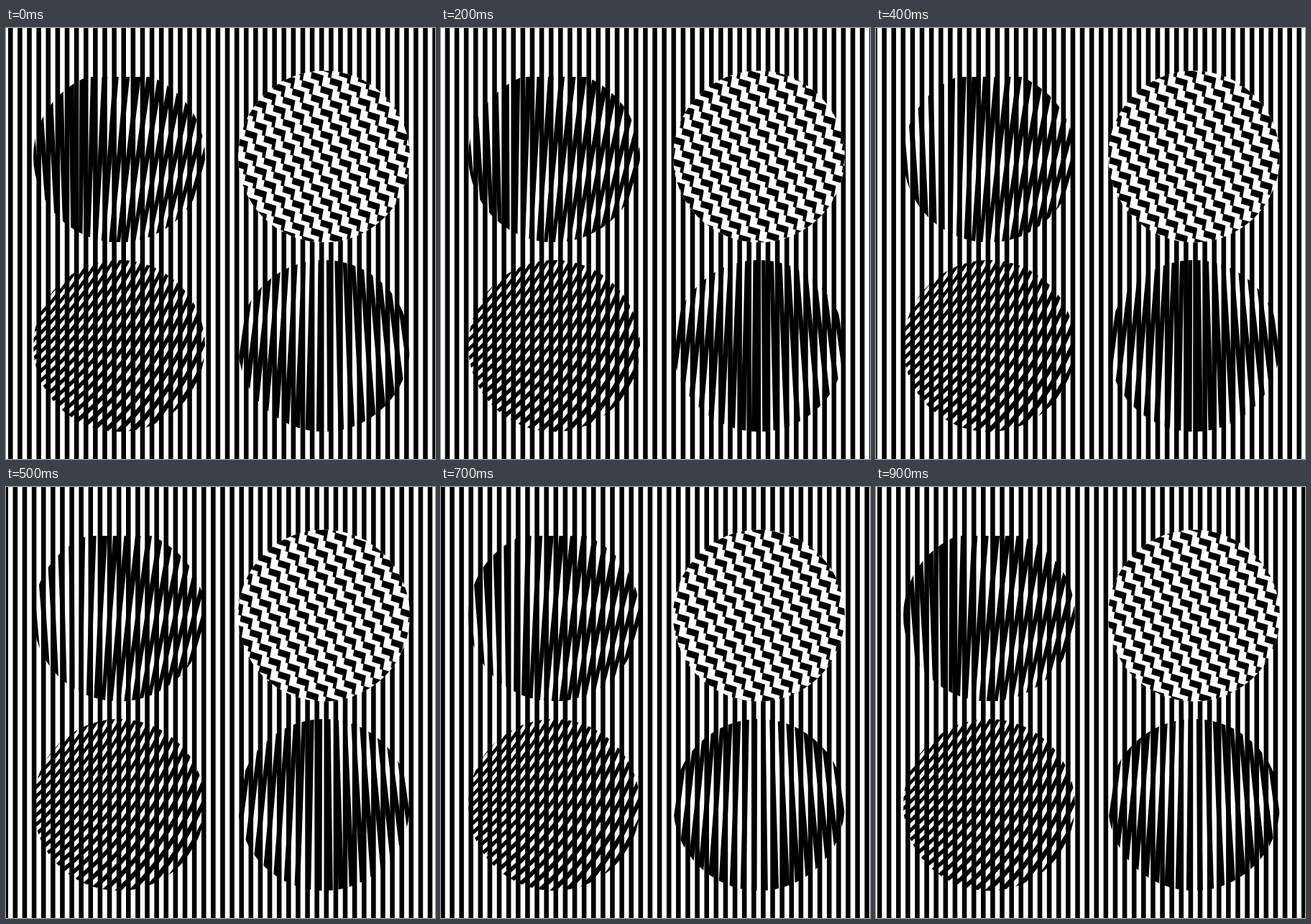
Recreate the animation shown at these times as an HTML page. Size 597 px wide and 600 px high, loop 1000 ms.

```html
<!DOCTYPE html>
<html lang="en">
<head>
<meta charset="utf-8">
<title>Moving stripes</title>
<style>
  html, body { margin: 0; width: 100%; height: 100%; overflow: hidden; background: #fff; }
  svg { display: block; width: 100%; height: 100%; }
</style>
</head>
<body>
<svg viewBox="0 0 597 600">
  <defs>
    <clipPath id="tl"><circle cx="157.5" cy="179" r="119.5"/></clipPath>
    <clipPath id="tr"><circle cx="442.5" cy="179" r="119.5"/></clipPath>
    <clipPath id="bl"><circle cx="157.5" cy="442.5" r="119.5"/></clipPath>
    <clipPath id="br"><circle cx="442.5" cy="442.5" r="119.5"/></clipPath>
  </defs>
  <path id="stripes"/>
  <g clip-path="url(#tl)"><path id="fanA"/></g>
  <g clip-path="url(#bl)"><path id="fanB"/></g>
  <g clip-path="url(#br)"><path id="fanC"/></g>
  <circle cx="442.5" cy="179" r="119.5" fill="#fff"/>
  <g clip-path="url(#tr)"><path id="weave"/></g>
</svg>
<script>
const PERIOD = 13.12, BAR = PERIOD / 2, START = 3;
const GAP = START + 1.5 * BAR;   // centre of the first gap
const LOOP = 1000, STEP = 100;
const RISE = -11.5;              // weave travel per loop
const byId = id => document.getElementById(id);
const poly = pts => 'M' + pts.map(p => p.map(v => v.toFixed(2)).join(' ')).join('L') + 'Z';

function stripes() {
  let d = '';
  for (let x = START - 2 * PERIOD; x < 610; x += PERIOD) d += `M${x} 0h${BAR}v600h${-BAR}z`;
  return d;
}

// Lines around x = cx whose spacing is scaled by spread(height above cy).
// At `phase` (in loops) they fill the gaps of the stripes along y = cy.
function fan({ cx, cy, spread, phase, top, bottom }) {
  const cuts = 12;
  const edge = x => Array.from({ length: cuts + 1 }, (_, i) => {
    const y = top + (bottom - top) * i / cuts;
    return [cx + (x - cx) * spread(y - cy), y];
  });
  let d = '';
  for (let n = -20; n < 66; n++) {
    const left = GAP + (n + phase) * PERIOD - BAR / 2;
    d += poly([...edge(left), ...edge(left + BAR).reverse()]);
  }
  return d;
}

// Tilted blocks across the gaps, each with a slanted stub below its right end.
function weave() {
  const tilt = 0.3, rows = 31;
  let d = '';
  for (let j = -7; j < 17; j++) {
    const x = GAP + (28 + j) * PERIOD;
    const shift = ((j * 19.5) % rows + rows) % rows;
    for (let k = -9; k < 4; k++) {
      const y = 269 + shift + k * rows;
      const part = (l, r, t, b) => poly([[l, t], [r, t], [r, b], [l, b]]
        .map(([px, py]) => [x + px - py * tilt * 0.6, y + py + px * tilt]));
      d += part(-8, 8, -4.5, 4.5);
      d += part(4, 8.5, -4, 11);
    }
  }
  return d;
}

const setPath = (id, d) => byId(id).setAttribute('d', d);
setPath('stripes', stripes());
setPath('fanA', fan({ cx: 98, cy: 178, spread: u => 1 - 0.00164 * u, phase: 0.03, top: 68, bottom: 298 }));
setPath('fanB', fan({ cx: 469, cy: 430, spread: u => 1 / (1 - 0.00235 * u), phase: 0.3, top: 322, bottom: 563 }));
setPath('fanC', fan({ cx: 442, cy: 428, spread: u => 1 + 0.00126 * u, phase: 0.3, top: 322, bottom: 563 }));
setPath('weave', weave());

function draw(ms) {
  const t = Math.floor(ms % LOOP / STEP) * STEP / LOOP;
  byId('stripes').setAttribute('transform', `translate(${PERIOD * t} 0)`);
  byId('weave').setAttribute('transform', `translate(${PERIOD * t} ${RISE * t})`);
}

const begin = performance.now();
function tick() {
  draw(performance.now() - begin);
  requestAnimationFrame(tick);
}
draw(0);
requestAnimationFrame(tick);
</script>
</body>
</html>
```
